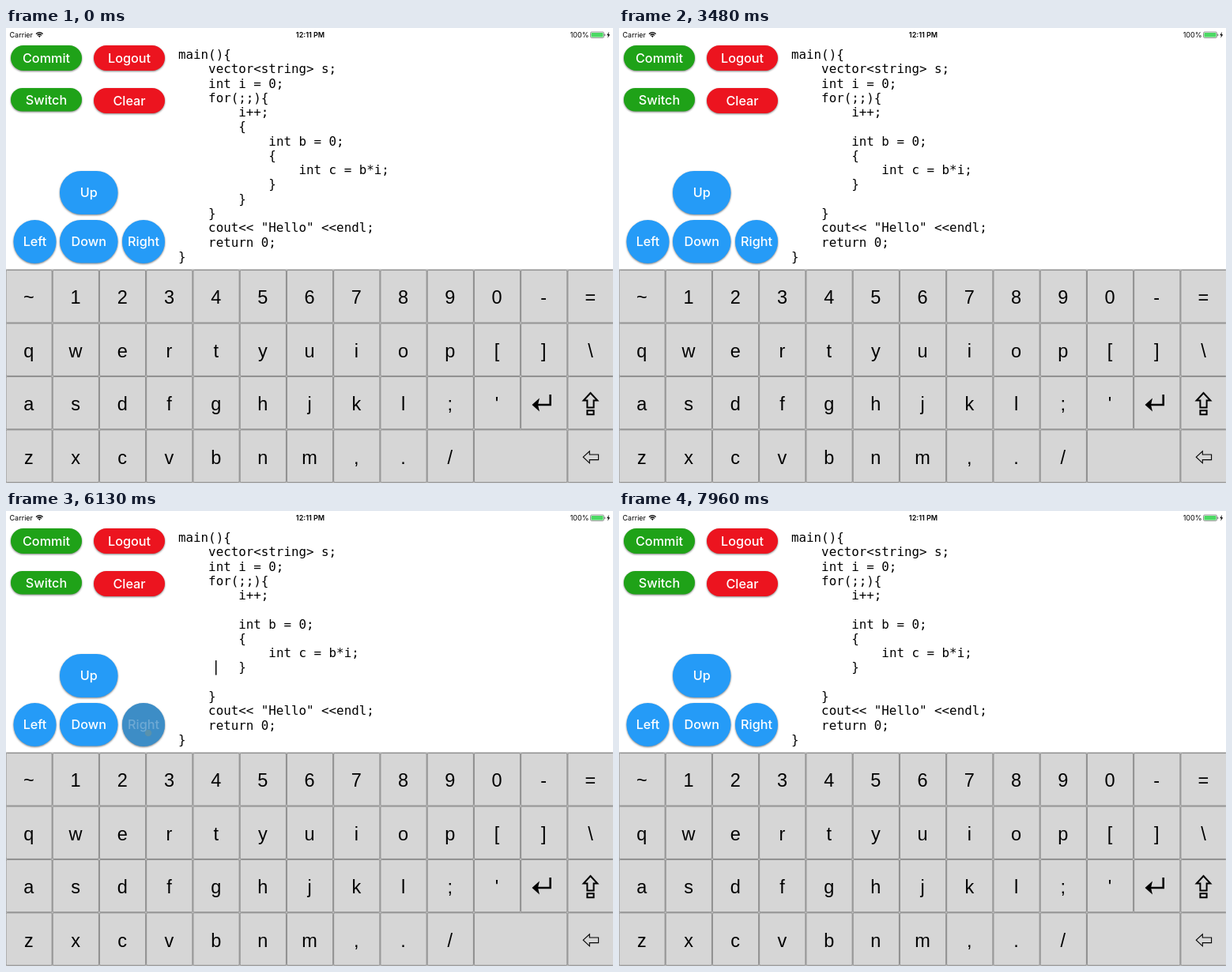
An HTML page that plays this animation: 768x576 px, repeating every 8 s.

```html
<!DOCTYPE html>
<html lang="en">
<head>
<meta charset="utf-8">
<title>Code editor</title>
<style>
  html, body { margin: 0; width: 100%; height: 100%; overflow: hidden; background: #fff; }
  svg { display: block; width: 768px; height: 576px; }
  .status { font: 9px Inter, sans-serif; }
  .code { font: 15.83px "DejaVu Sans Mono", monospace; }
  .key { font: 23.5px "Liberation Sans", sans-serif; text-anchor: middle; }
  .label { font: 500 16.2px Inter, sans-serif; fill: #fff; text-anchor: middle; }
  .shadow { filter: drop-shadow(0 1.5px 1.2px rgba(0, 0, 0, .5)); }
</style>
</head>
<body>
<svg id="stage" viewBox="0 0 768 576"></svg>
<script>
const LOOP = 8000;
const COL = 9.53, LINE = 18.27, CODE_X = 218, CODE_Y = 39;
const stage = document.getElementById('stage');

function add(tag, attrs, parent = stage, text) {
  const node = document.createElementNS('http://www.w3.org/2000/svg', tag);
  for (const name in attrs) node.setAttribute(name, attrs[name]);
  if (text !== undefined) node.textContent = text;
  return parent.appendChild(node);
}

function drawStatusBar() {
  const bar = add('g', { class: 'status' });
  add('text', { x: 4.5, y: 12 }, bar, 'Carrier');
  add('text', { x: 385, y: 12, 'text-anchor': 'middle', 'font-weight': 600 }, bar, '12:11 PM');
  add('text', { x: 737.5, y: 12, 'text-anchor': 'end' }, bar, '100%');
  add('path', { d: 'M38 7.6Q42.3 3.6 46.6 7.6M39.6 9.3Q42.3 6.8 45 9.3', fill: 'none', stroke: '#000', 'stroke-width': 1.3 }, bar);
  add('path', { d: 'M40.8 10.2Q42.3 8.9 43.8 10.2L42.3 12Z' }, bar);
  add('rect', { x: 739.5, y: 5, width: 17, height: 7.4, rx: 1.6, fill: '#fff', stroke: '#666', 'stroke-width': .7 }, bar);
  add('rect', { x: 740.4, y: 5.9, width: 15.2, height: 5.6, rx: .8, fill: '#4cd964' }, bar);
  add('rect', { x: 757.3, y: 7.5, width: 1, height: 2.6, rx: .5, fill: '#666' }, bar);
  add('path', { d: 'M763 4.8L760.2 9.3H762L761.2 12.8L764.2 8.2H762.3Z' }, bar);
}

// Adds the tinted layer and growing spot that answer a tap.
function addInk(box, rx, x, y, label, tint, spotColor) {
  const id = 'clip' + stage.querySelectorAll('clipPath').length;
  add('rect', { ...box, rx }, add('clipPath', { id }));
  const group = add('g', { 'clip-path': `url(#${id})` });
  const cover = add('rect', { ...box, fill: tint, opacity: 0 }, group);
  const spot = add('circle', { cx: x, cy: y, r: 0, fill: spotColor, opacity: 0 }, group);
  stage.appendChild(label);
  return { cover, spot, label };
}

function button(text, x, y, width, height, rx, fill) {
  const box = { x, y, width, height };
  add('rect', { ...box, rx, fill, class: 'shadow' });
  const label = add('text', { x: x + width / 2, y: y + height / 2 + 5.8, class: 'label' }, stage, text);
  return { box, rx, label };
}

function drawButtons() {
  const green = '#1fa218', red = '#ec141f', blue = '#259bf7';
  button('Commit', 6, 22, 90, 32, 16, green);
  button('Logout', 111, 22, 90, 32, 16, red);
  button('Switch', 6, 76, 90, 29.5, 14.7, green);
  button('Clear', 111, 76, 90, 32, 16, red);
  const up = button('Up', 68, 181, 73.5, 55, 27, blue);
  button('Left', 9.5, 243, 54, 55, 27, blue);
  button('Down', 68, 243, 73.5, 54.5, 27, blue);
  const right = button('Right', 147, 243, 54, 55, 27, blue);
  const ink = (b, x, y) => addInk(b.box, b.rx, x, y, b.label, 'rgba(88,125,145,.48)', '#8a9a80');
  return { up: ink(up, 108, 215), right: ink(right, 180, 281) };
}

function drawKeyboard() {
  const rows = ['~1234567890-=', 'qwertyuiop[]\\', "asdfghjkl;'", 'zxcvbnm,./'];
  const pitch = 59.25, rowPitch = 67.4, top = 306.2;
  const edge = c => c ? c * pitch - .6 : -.5;
  add('rect', { x: 0, y: 305.2, width: 768, height: 271, fill: '#bdbdbd' });
  const cell = (c, r, span = 1) => {
    const box = {
      x: edge(c) + .5, y: top + r * rowPitch + .4,
      width: edge(c + span) - edge(c) - 1, height: rowPitch - 1
    };
    add('rect', { ...box, rx: 1.5, fill: '#d6d6d6', stroke: '#8c8c8c', 'stroke-width': 1 });
    return box;
  };
  rows.forEach((row, r) => {
    for (let c = 0; c < (r < 3 ? 13 : 10); c++) {
      cell(c, r);
      if (row[c]) add('text', { x: 28.8 + c * 59.22, y: 349 + r * 67.5, class: 'key' }, stage, row[c]);
    }
  });
  cell(10, 3, 2);
  const eraseBox = cell(12, 3);
  const outline = { fill: 'none', stroke: '#000' };
  add('path', { d: 'M688.7 464V477H670', ...outline, 'stroke-width': 2.6 });
  add('path', { d: 'M665.5 477L675 468.5L673 477L675 485.5Z' });
  add('path', { d: 'M739.5 462L748.3 471.5H743.6V480.5H735.4V471.5H730.7ZM735.4 484.2H743.6V489.3H735.4Z', ...outline, 'stroke-width': 2 });
  const arrow = add('path', { d: 'M730.3 543.2L738.3 535.8V540H749.6V546.6H738.3V550.8Z', ...outline, 'stroke-width': 1.1 });
  return addInk(eraseBox, 1, 743, 539.5, arrow, 'rgba(80,80,80,.34)', '#777');
}

// Text, indent, and indent after the edit; a null indent removes the line's text.
const SOURCE = [
  ['main(){', 0, 0], ['vector<string> s;', 4, 4], ['int i = 0;', 4, 4],
  ['for(;;){', 4, 4], ['i++;', 8, 8], ['{', 8, null],
  ['int b = 0;', 12, 8], ['{', 12, 8], ['int c = b*i;', 16, 12],
  ['}', 12, 8], ['}', 8, null], ['}', 4, 4],
  ['cout<< "Hello" <<endl;', 4, 4], ['return 0;', 4, 4], ['}', 0, 0]
];

function drawCode(version) {
  const group = add('g', { class: 'code' });
  SOURCE.forEach((entry, i) => {
    const indent = entry[version];
    if (indent === null) return;
    add('text', { x: CODE_X + indent * COL, y: CODE_Y + i * LINE }, group, entry[0]);
  });
  return group;
}

drawStatusBar();
const { up, right } = drawButtons();
const erase = drawKeyboard();
const before = drawCode(1), after = drawCode(2);
const caret = add('rect', { width: 1.5, height: 18.5 });

const EDIT = 2710, UP = 4620;
const RIGHT_TAPS = [6080, 6340, 6590, 6850, 7120];
// Caret stops: time, line, column.
const CARET = [
  [50 - 1000, 10, 9], [EDIT, 10, 4], [UP, 9, 4],
  ...RIGHT_TAPS.map((time, i) => [time, 9, 5 + i])
];

const clamp = v => Math.max(0, Math.min(1, v));

function blink(age) {
  const p = age % 1000;
  return p < 500 ? 1 : p < 950 ? clamp((680 - p) / 160) : (p - 950) / 50;
}

function showTap({ cover, spot, label }, taps, t) {
  const start = taps.filter(time => time <= t).pop();
  const age = start === undefined ? Infinity : t - start;
  const p = clamp(age / 750);
  cover.setAttribute('opacity', p < .1 ? 1 : 1 - (p - .1) / .9);
  spot.setAttribute('r', 4 + 56 * p * p);
  spot.setAttribute('opacity', .4 * (1 - p));
  label.setAttribute('opacity', .25 + .75 * clamp((age - 110) / 90));
}

function render() {
  const t = performance.now() % LOOP;
  before.setAttribute('display', t < EDIT ? 'inline' : 'none');
  after.setAttribute('display', t < EDIT ? 'none' : 'inline');
  const [since, line, col] = CARET.filter(stop => stop[0] <= t).pop();
  caret.setAttribute('x', 217.3 + col * COL);
  caret.setAttribute('y', CODE_Y + line * LINE - 14.3);
  caret.setAttribute('opacity', blink(t - since));
  showTap(erase, [2645], t);
  showTap(up, [UP], t);
  showTap(right, RIGHT_TAPS, t);
  requestAnimationFrame(render);
}
render();
</script>
</body>
</html>
```
